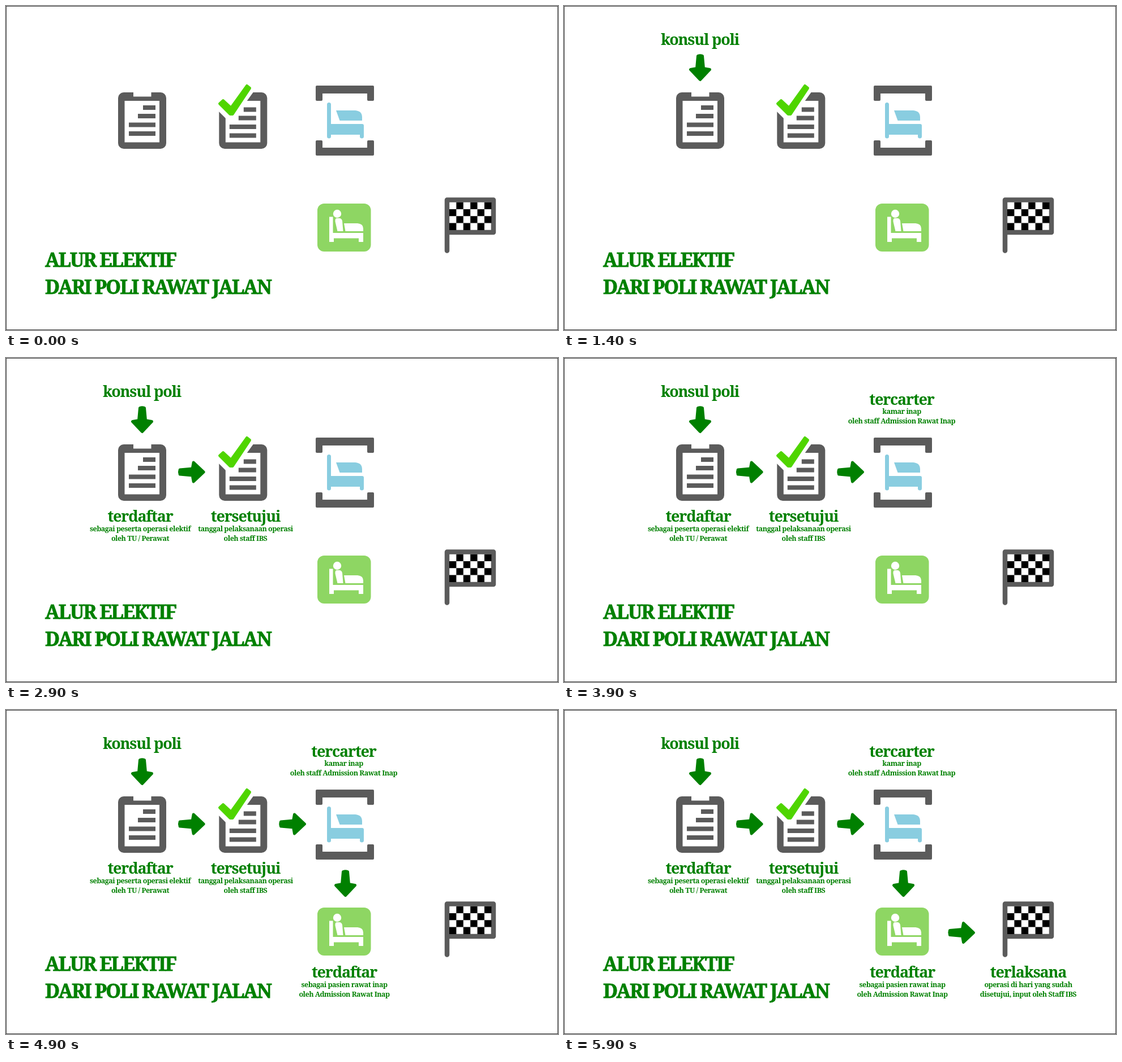
An HTML page for the animation above (8000 ms loop, 975 px wide and 574 px high).

```html
<!DOCTYPE html>
<html lang="id">
<head>
<meta charset="utf-8">
<title>Alur elektif</title>
<style>
  html, body { margin: 0; width: 100%; height: 100%; overflow: hidden; background: #fff; }
  svg { display: block; width: 100%; height: 100%; }
  text { font: bold 12.5px "Noto Serif", serif; letter-spacing: -.039em; fill: #008000; text-anchor: middle; }
  .title { font-size: 34px; letter-spacing: -.058em; text-anchor: start; stroke: #008000; stroke-width: .8; }
  .head { font-size: 27px; letter-spacing: -.046em; }
  .gray { fill: #5b5b5b; }
  .white { fill: #fff; }
  .arrow, .check { fill: #008000; stroke: #008000; stroke-width: 5; stroke-linejoin: round; }
  .check { fill: #4fd500; stroke: #4fd500; }
</style>
</head>
<body>
<svg viewBox="0 0 975 574">
  <defs>
    <path id="lines" class="gray" d="M242 176h22v8h-22zM233 191h31v8h-31zM217 206.500h47v8h-47zM217 222h47v8h-47z"/>
    <path id="board" class="gray" fill-rule="evenodd"
      d="M208 153H273a10 10 0 0 1 10 10V243a10 10 0 0 1-10 10H208a10 10 0 0 1-10-10V163a10 10 0 0 1 10-10zM209.500 168V241.500H271V168z"/>
    <path id="bracket" class="gray" d="M549 141H648q2 0 2 2V166q0 2-2 2H640q-2 0-2-2V155H559V166q0 2-2 2H549q-2 0-2-2V143q0-2 2-2z"/>
  </defs>

  <!-- registered -->
  <use href="#board"/>
  <use href="#lines"/>
  <path class="white" d="M225 152h31.500v8.500h-31.500z"/>

  <!-- approved -->
  <use href="#board" x="178.300"/>
  <path class="white" d="M370 145H442L436.500 153 402 201 391 202 376 187 370 181z"/>
  <use href="#lines" x="177.800" y="3.500"/>
  <path class="check" d="M377.500 173 383.500 167.500 397.500 180.500 425.500 141.500 430.500 145.500 400 191.500H396z"/>

  <!-- reserved room -->
  <use href="#bracket"/>
  <use href="#bracket" transform="matrix(1 0 0 -1 0 406)"/>
  <g fill="#89cde0">
    <path d="M567 174.500a3.500 3.500 0 0 1 7 0V209H629q3 0 3 3V231a3.500 3.500 0 0 1-7 0V228H574V231a3.500 3.500 0 0 1-7 0z"/>
    <path d="M583 185H617Q629 186 629 197V203H589.500z"/>
  </g>

  <!-- inpatient -->
  <rect x="550" y="350" width="94.500" height="85" rx="12" fill="#8ed663"/>
  <g class="white">
    <circle cx="585" cy="368" r="7.200"/>
    <path d="M584 376H588.500Q593 376 594 381L595.500 399H585.500L581.500 382Q581 376.500 584 376z"/>
    <path d="M597 385H621Q631 386 631 394V399H599.500z"/>
    <path d="M571 373.500H577.500V402H631V418H623V411.500H579V418H571z"/>
  </g>

  <!-- finish flag -->
  <path d="M779 433.500V343.500H861V401H779" fill="none" stroke="#5b5b5b" stroke-width="8.500" stroke-linecap="round" stroke-linejoin="round"/>
  <path id="checks"/>

  <text class="title" x="69" y="462">ALUR ELEKTIF</text>
  <text class="title" x="69" y="510">DARI POLI RAWAT JALAN</text>
  <g id="steps"></g>
  <rect x=".5" y=".5" width="974" height="573" fill="none" stroke="#444"/>
</svg>
<script>
  const LOOP = 8000, FIRST_STEP = 900, STEP = 500;

  const label = (x, y, head, ...notes) =>
    `<text class="head" x="${x}" y="${y}">${head}</text>` +
    notes.map((note, i) => `<text x="${x}" y="${y + 16.5 + i * 17.2}">${note}</text>`).join('');

  const arrow = (x, y, angle) =>
    `<path class="arrow" transform="translate(${x} ${y}) rotate(${angle})"
      d="M-4 3.500Q0 2 4 3.500L6 25.500 17 27.500 0 45.500-17 27.500-6 25.500z"/>`;

  const steps = [
    label(240, 69, 'konsul poli'),
    arrow(240.5, 85, 0),
    label(237, 290, 'terdaftar', 'sebagai peserta operasi elektif', 'oleh TU / Perawat'),
    arrow(303.7, 202, -90),
    label(423, 290, 'tersetujui', 'tanggal pelaksanaan operasi', 'oleh staff IBS'),
    arrow(482, 202, -90),
    label(596.5, 82.5, 'tercarter', 'kamar inap', 'oleh staff Admission Rawat Inap'),
    arrow(599.5, 283, 0),
    label(597.5, 474, 'terdaftar', 'sebagai pasien rawat inap', 'oleh Admission Rawat Inap'),
    arrow(678, 394.5, -90),
    label(820, 474, 'terlaksana', 'operasi di hari yang sudah', 'disetujui, input oleh Staff IBS')
  ];

  const group = document.getElementById('steps');
  group.innerHTML = steps.map(step => `<g>${step}</g>`).join('');

  let checks = '';
  for (let row = 0; row < 4; row++)
    for (let col = 0; col < 6; col++)
      if ((row + col) % 2) checks += `M${783 + col * 12.4} ${347.7 + row * 12.3}h12.4v12.3h-12.4z`;
  document.getElementById('checks').setAttribute('d', checks);

  const start = performance.now();
  function draw() {
    const time = (performance.now() - start) % LOOP;
    [...group.children].forEach((step, i) => {
      step.style.display = time >= FIRST_STEP + i * STEP ? '' : 'none';
    });
    requestAnimationFrame(draw);
  }
  draw();
</script>
</body>
</html>
```
